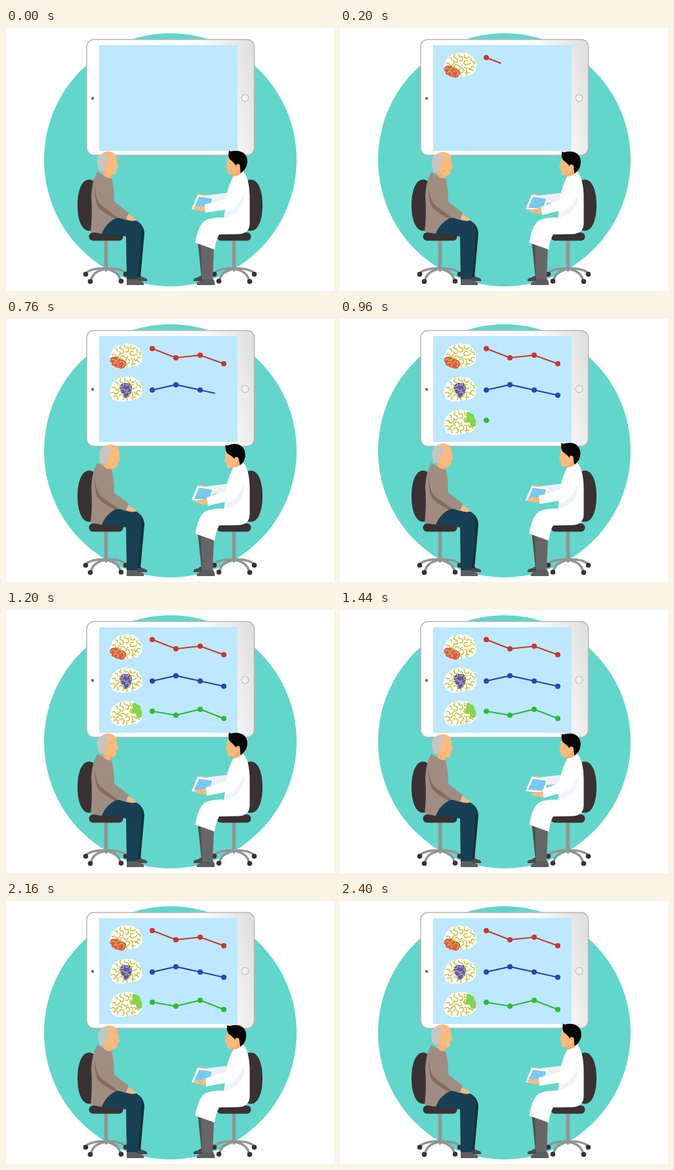
An HTML page for the animation above (2.44 s loop, 500 px wide and 400 px high).

```html
<!DOCTYPE html>
<html lang="en">
<head>
<meta charset="utf-8">
<title>Consultation</title>
<style>
html, body { margin: 0; width: 100%; height: 100%; overflow: hidden; background: #fff; }
svg { display: block; width: 100vw; height: 100vh; }
</style>
</head>
<body>
<svg viewBox="0 0 500 400" xmlns="http://www.w3.org/2000/svg">
  <defs>
    <linearGradient id="shell" x1="0" y1=".35" x2="1" y2=".2">
      <stop offset=".68" stop-color="#fff"/>
      <stop offset="1" stop-color="#e0e0e0"/>
    </linearGradient>
    <g id="chair">
      <path d="M127 230.500C139 230.500 144 250 144 270.500S139 308.500 127 308.500S109 291 109 269.500S115 230.500 127 230.500Z" fill="#3a3133"/>
      <g fill="none" stroke="#929496" stroke-width="3.600" stroke-linecap="round">
        <path d="M152.500 322V365" stroke-width="5.500" stroke-linecap="butt"/>
        <path d="M152 365.500Q130 365 122 372.500M152 365.500Q175 365 182 372.500M151 366.500Q133 370 130 382.500M153 366.500Q171 370 174 382M152.500 364V369"/>
      </g>
      <g fill="#3a3133">
        <circle cx="121.500" cy="374.500" r="3.800"/><circle cx="128.500" cy="385.500" r="3.800"/>
        <circle cx="182.500" cy="374.500" r="3.800"/><circle cx="175.500" cy="385" r="3.800"/>
        <rect x="126.500" y="311" width="52" height="12.500" rx="6.200"/>
      </g>
    </g>
    <path id="lobes" d="M1 24Q-1 19 3 16Q2 10 8 8Q11 2 18 3Q24 -1 30 2Q37 0 40 5Q46 6 46 12Q51 16 49 22Q51 28 46 31Q44 36 37 35Q31 38 26 37Q21 40 16 38Q10 40 8 36Q2 36 3 30Q-1 28 1 24Z" fill="#fffef6"/>
    <g id="folds" fill="none" stroke="#c9b93c" stroke-width="1.500" stroke-linecap="round">
      <path d="M4 18q4-3 5 1t5 0t1-6"/>
      <path d="M9 9q4 0 3 4M17 4q-3 4 1 5t3 5q-1 3-4 2"/>
      <path d="M23 3q-1 4 3 4t3 4q-1 4-5 2"/>
      <path d="M32 4q-2 4 2 5t5-2M36 13q-5-1-5 3t5 3t5-3"/>
      <path d="M42 9q-2 4 2 5t3 4M47 23q-4-3-5 1t-5 0"/>
      <path d="M2 26q4-3 6 0t5-2t5 1M6 32q2-4 5-2t1 6"/>
      <path d="M15 30q3-4 6-1t-1 7M17 20q4-2 6 1t5-1"/>
      <path d="M24 26q4-4 6 0t-2 5t-1 5M32 24q4 0 3 4t4 4"/>
      <path d="M39 27q4-1 6 2M33 32q2-1 2 3"/>
    </g>
  </defs>

  <circle cx="250.500" cy="200.500" r="192.500" fill="#62d6cb"/>

  <rect x="123" y="17.500" width="255.500" height="176" rx="11" fill="url(#shell)" stroke="#b4b6b7" stroke-width="1.500"/>
  <rect x="142" y="26" width="211" height="161" fill="#bde8ff"/>
  <circle cx="132" cy="107" r="2.200" fill="#6b6b70"/>
  <circle cx="364.500" cy="106.500" r="5.300" fill="#f1f1f1" stroke="#c2c2c2" stroke-width="1.200"/>
  <g id="rows"></g>

  <use href="#chair"/>
  <use href="#chair" transform="matrix(-1 0 0 1 500 0)"/>

  <!-- patient -->
  <path d="M197 385V377H205Q209 380 213 380.500Q216 382 215 385Z" fill="#4b494c"/>
  <path d="M190 292Q209 293 211 312L205 379H196Z" fill="#12303f"/>
  <path d="M144 313Q147 297 162 288L190 290Q206 292 207 308Q206 345 200 383H184L183 317Q165 314 144 313Z" fill="#183f54"/>
  <path d="M184 382H199Q203 385 208 386Q211 388 210 391H184Z" fill="#5d5c5f"/>
  <g id="patientHead">
    <path d="M147 210L149 228Q155 231 160 229L161 216Z" fill="#fbb276"/>
    <path d="M146 191Q155 185 164 190Q169 194 169 203L171.500 211L168.500 213L168 219Q167.500 223 162 223.500Q155 222 151 215Z" fill="#fdb97e"/>
    <path d="M148 190Q139 193.500 138.500 203Q139 211 142 217Q145 220 150 217Q151 211 154 209L153 204Q157 201 157.500 196Q152 194 148 190Z" fill="#c7c5c1"/>
    <ellipse cx="154.500" cy="206.500" rx="2.400" ry="3.800" fill="#fdb97e"/>
  </g>
  <path d="M139 219Q147 222 152 227Q157 229 161 228.500Q165 243 165 264L187 281L183 292L170 288Q152 296 146 313L129 310Q132 285 130 255Q131 233 139 219Z" fill="#a08d81"/>
  <path d="M135.500 239Q136 263 147 271L170 288L166 290Q144 279 139 270Q134 256 135.500 239Z" fill="#876c5d"/>
  <path d="M186 284Q192 285 199 292Q195 295 183 291.500Z" fill="#fdb97e"/>

  <!-- doctor -->
  <path d="M303 385V377H296Q293 380 288 380.500Q285 382 286 385Z" fill="#4b494c"/>
  <path d="M292 322L298 380H306L304 325Z" fill="#4f4f52"/>
  <path d="M297 322L299 383H315L317 332Z" fill="#666668"/>
  <path d="M316 382H301Q298 385 293 386Q290 388 291 391H318Q319 386 316 382Z" fill="#5d5c5f"/>
  <path d="M306 258.500Q296 257.500 291 253.500Q294 250.500 307 254.500Z" fill="#fdb97e"/>
  <path d="M339 250.500L305 254.500L308 267L339 264Z" fill="#edf1f6"/>
  <g id="doctorHead">
    <path d="M346 211L345 228L358 230L362 211Z" fill="#f9ab6d"/>
    <path d="M340 193Q337 199 337 205L334.500 210.500L337 213.500L337.500 219.500Q338.500 223 343.500 222.500Q351 220 356 213L358 197Z" fill="#fdb97e"/>
    <path d="M340 186.500L343 187.700Q355 184.700 363 190.700Q370 197.700 367 208.700Q365 216 357.500 220.700L356.500 208L353.500 206.700L351 210Q348 205 341 199.500Q338 194 340 186.500Z" fill="#050505"/>
    <ellipse cx="353" cy="210.700" rx="2.500" ry="4" fill="#fdb97e"/>
  </g>
  <path d="M361.500 218.500Q370.500 227 371.500 255V298Q370.500 313 354 313.500L325 314Q320 322 318 337L288.500 326.500Q293 299 304 292.500Q317 287.500 332.500 288.500L335.500 257Q339.500 238 346.500 226Q355 225 361.500 218.500Z" fill="#fff"/>
  <path d="M363 250Q355 273 336 280L334 288Q350 285 357 275Q364 263 363 250Z" fill="#eff3f9"/>
  <path d="M292 254L317.500 257.500L311.500 278L283 275.500Z" fill="#fff" stroke="#dce6ee" stroke-width=".7"/>
  <path d="M294.300 256.500L314.500 259.500L309.300 275.300L286.800 273.300Z" fill="#79c9ef"/>
  <g id="forearm">
    <path d="M305 270L296 271.500Q288 270 284.500 273.500Q289 278 304 279.500Z" fill="#fdb97e"/>
    <path d="M303 268.500L338 259Q350 254 354 262Q351 273 336 276L304 281Z" fill="#fff"/>
  </g>
</svg>
<script>
const LOOP = 2440, STEP = 40, ROW_GAP = 400, SEG_TIME = 80;
const NS = 'http://www.w3.org/2000/svg';
const $ = id => document.getElementById(id);

function add(parent, tag, attrs) {
  const el = document.createElementNS(NS, tag);
  for (const k in attrs) el.setAttribute(k, attrs[k]);
  return parent.appendChild(el);
}

const rows = [
  { y: 36.5, ink: '#c8372f', tint: '#dc5c4c', heights: [45, 59, 55, 68],
    area: 'M1 24Q3 20 8 21Q13 20 15 24Q21 24 25 29Q26 34 22 38Q18 40 14 38Q9 38 7 35Q2 35 3 30Q-1 28 1 24Z' },
  { y: 87, ink: '#2b42b9', tint: '#5b55c9', heights: [108, 100, 108, 116],
    area: 'M17 13Q21 8 26 11Q31 8 32 13Q36 18 33 22Q34 27 29 28Q29 34 24 33Q18 32 22 27Q15 26 17 21Q13 17 17 13Z' },
  { y: 137.5, ink: '#2eb936', tint: '#70dc55', heights: [154, 160, 151, 165],
    area: 'M34 5Q38 2 42 6Q47 7 47 13Q51 17 49 22Q50 26 45 27Q40 25 40 20Q33 21 32 16Q37 13 34 5Z' }
].map((row, i) => {
  const xs = [223, 259, 296, 332];
  const pts = xs.map((x, k) => [x, row.heights[k]]);
  const brain = add($('rows'), 'g', { transform: `translate(158 ${row.y})` });
  add(brain, 'use', { href: '#lobes' });
  add(brain, 'path', { d: row.area, fill: row.tint });
  add(brain, 'use', { href: '#folds' });
  const line = add($('rows'), 'polyline', { fill: 'none', stroke: row.ink, 'stroke-width': 2.2 });
  const dots = pts.map(([cx, cy]) => add($('rows'), 'circle', { cx, cy, r: 4, fill: row.ink }));
  return { pts, brain, line, dots, start: i * ROW_GAP };
});

const clamp = v => Math.max(0, Math.min(1, v));
const ease = v => (1 - Math.cos(Math.PI * v)) / 2;

function keyed(keys, t) {
  let i = 1;
  while (i < keys.length - 1 && t > keys[i][0]) i++;
  const [t0, a] = keys[i - 1], [t1, b] = keys[i];
  return a + (b - a) * ease(clamp((t - t0) / (t1 - t0)));
}

function drawRow({ pts, brain, line, dots, start }, t) {
  brain.setAttribute('opacity', clamp((t - start - 30) / 80));
  const p = Math.min(3, (t - start - 150) / SEG_TIME);
  dots.forEach((dot, k) => dot.setAttribute('visibility', p >= k ? 'visible' : 'hidden'));
  const shown = pts.filter((_, k) => k <= p);
  const k = Math.floor(p);
  if (p > 0 && k < 3) {
    const [x, y] = pts[k], [nx, ny] = pts[k + 1], f = p - k;
    shown.push([x + (nx - x) * f, y + (ny - y) * f]);
  }
  line.setAttribute('points', shown.join(' '));
}

const swipe = [[0, 0], [330, 1], [560, 1], [1020, 0], [1500, 1], [LOOP, 0]];

function draw(t) {
  rows.forEach(row => drawRow(row, t));
  const nod = (1 - Math.cos(4 * Math.PI * t / LOOP)) / 2;
  const reach = keyed(swipe, t);
  $('patientHead').setAttribute('transform', `translate(${nod} ${3 * nod}) rotate(${9 * nod} 152 224)`);
  $('doctorHead').setAttribute('transform', `translate(0 ${3 * nod}) rotate(${-10 * nod} 355 224)`);
  $('forearm').setAttribute('transform', `translate(${4.5 * reach} 0) rotate(${-7 * reach} 345 265)`);
}

const begin = performance.now();
function tick() {
  const t = (performance.now() - begin) % LOOP;
  draw(Math.floor(t / STEP) * STEP);
  requestAnimationFrame(tick);
}
draw(0);
requestAnimationFrame(tick);
</script>
</body>
</html>
```
